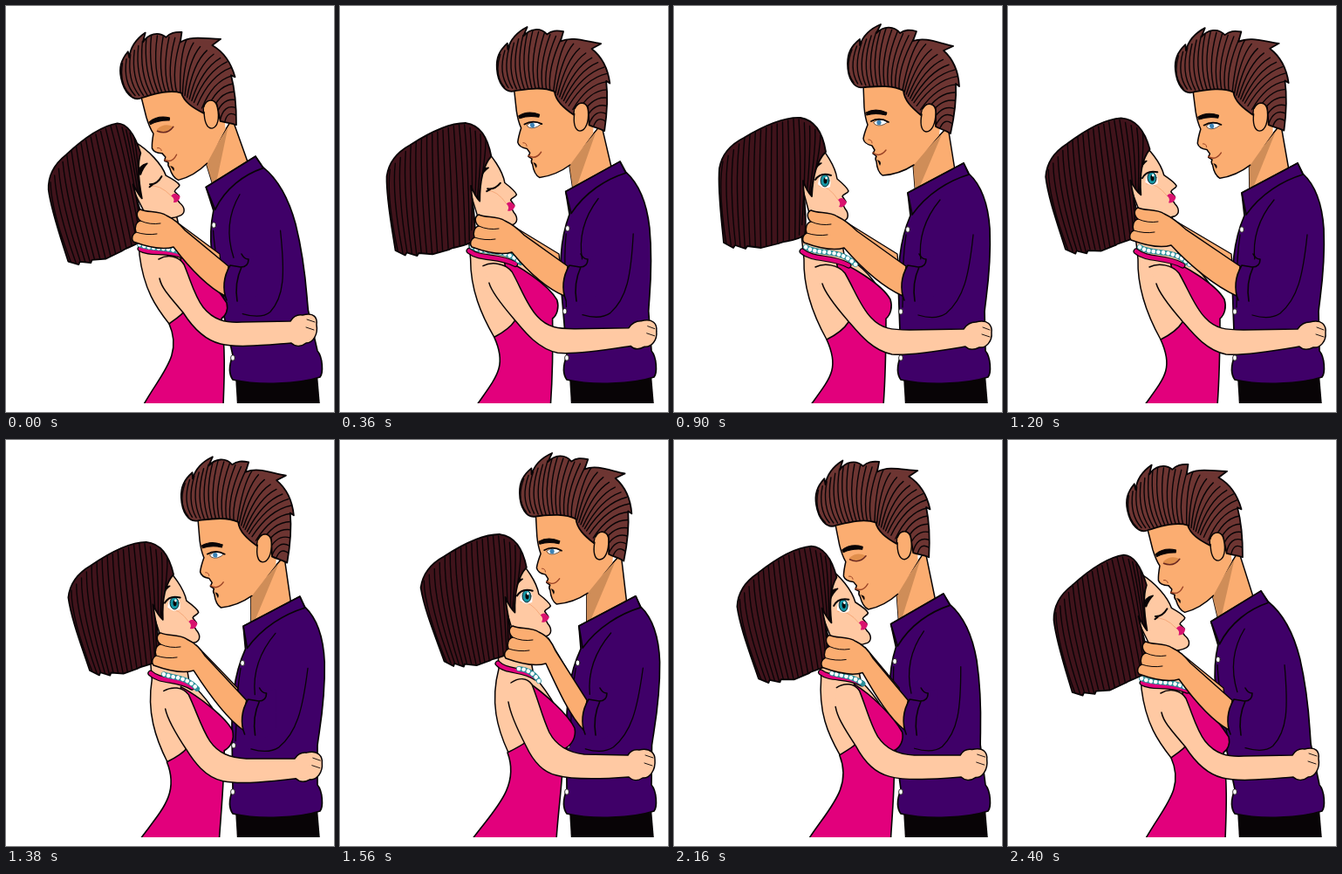
Write an HTML page with a canvas that moves like this. It is 376 by 465 pixels and loops after 2.46 s.

```html
<!DOCTYPE html>
<html lang="en">
<head>
<meta charset="utf-8">
<title>Couple</title>
<style>
html, body { margin: 0; width: 100%; height: 100%; overflow: hidden; background: #fff; }
canvas { display: block; width: 376px; height: 465px; }
</style>
</head>
<body>
<canvas id="stage" width="376" height="465"></canvas>
<script>
const ctx = document.getElementById('stage').getContext('2d');
const LOOP = 2460, STEP = 60;
const INK = '#080406', TAN = '#fbad71', TAN_DARK = '#cf8d58', PEACH = '#ffc9a3';
const PURPLE = '#3f0068', PINK = '#e2007c', BROWN = '#6d3532', MAROON = '#40131b';

// time, his head x y angle, her head x y angle, hair bend, lean, elbow, body near, body kiss, his eye, her eye
const POSES = [
  [0, 235, 125, -12, 170, 199, -12, 0, -46, -11, 0, 1, 0, 0],
  [60, 232, 126, -12.5, 167, 200, -12, 0, -49, -12, 0, 1, 0, 0],
  [360, 276, 128, -4, 175, 205, -2, 2, -11, -5, 0, .15, .9, 0],
  [900, 291, 129, 0, 173, 200, 0, 0, 0, 0, 0, 0, 1, 1],
  [1140, 287, 128, -5, 154, 197, -8, 10, -2, 0, -.08, 0, 1, 1],
  [1200, 289, 128, -5, 165, 197, -6, 9, 0, 0, 0, 0, 1, 1],
  [1560, 299, 122, -1, 214, 179, -2, 19, 7, 17, 1, 0, 1, 1],
  [1920, 285, 121, -6, 211, 183, -4, 17, -6, 12, 1, 0, 0, 1],
  [2400, 240, 123, -12, 174, 197, -11, 0, -42, -9, 0, 1, 0, 0]
];

function poseAt(t) {
  const n = POSES.length;
  const row = i => {
    const p = POSES[(i + n) % n].slice();
    p[0] += LOOP * Math.floor(i / n);
    return p;
  };
  let i = n - 1;
  while (POSES[i][0] > t) i--;
  const [z, a, b, c] = [row(i - 1), row(i), row(i + 1), row(i + 2)];
  const h = b[0] - a[0], s = (t - a[0]) / h;
  return a.map((v, k) => {
    const m0 = (b[k] - z[k]) / (b[0] - z[0]) * h;
    const m1 = (c[k] - a[k]) / (c[0] - a[0]) * h;
    const d = b[k] - v;
    return v + s * (m0 + s * (3 * d - 2 * m0 - m1 + s * (m0 + m1 - 2 * d)));
  });
}

// Maps every coordinate pair of a path through f
const warp = (d, f) => d.replace(/(-?[\d.]+) (-?[\d.]+)/g,
  (_, x, y) => f(+x, +y).map(v => v.toFixed(2)).join(' '));

// Blends three paths of equal structure
function blend([a, b, c], u, v) {
  const nums = s => s.match(/-?[\d.]+/g).map(Number);
  const B = nums(b), C = nums(c);
  let i = 0;
  return a.replace(/-?[\d.]+/g, s => {
    const n = +s, r = n + u * (B[i] - n) + v * (C[i] - n);
    i++;
    return r.toFixed(2);
  });
}

function draw(d, fill, stroke, width = 1.5) {
  const p = new Path2D(d);
  if (fill) { ctx.fillStyle = fill; ctx.fill(p); }
  if (stroke) { ctx.strokeStyle = stroke; ctx.lineWidth = width; ctx.stroke(p); }
}

function oval(x, y, rx, ry, fill, stroke, width) {
  ctx.beginPath();
  ctx.ellipse(x, y, rx, ry, 0, 0, 7);
  ctx.fillStyle = fill;
  ctx.fill();
  if (stroke) { ctx.strokeStyle = stroke; ctx.lineWidth = width; ctx.stroke(); }
}

function along(pts, k) {
  const f = k * (pts.length - 1), i = Math.min(Math.floor(f), pts.length - 2), s = f - i;
  return pts[i].map((v, j) => v + s * (pts[i + 1][j] - v));
}

function hair(outline, color, from, to, count, bulge, map = (x, y) => [x, y]) {
  const shape = warp(outline, map);
  draw(shape, color, INK, 1.8);
  ctx.save();
  ctx.clip(new Path2D(shape));
  for (let i = 0; i < count; i++) {
    const k = i / (count - 1), [x, y] = along(from, k), [X, Y] = along(to, k);
    const [bx, by] = bulge(k);
    draw(warp(`M${x} ${y} Q${(x + X) / 2 + bx} ${(y + Y) / 2 + by} ${X} ${Y}`, map), null, INK, 1.4);
  }
  ctx.restore();
}

function inHead(x, y, angle, px, py, paintHead) {
  ctx.save();
  ctx.translate(x, y);
  ctx.rotate(angle * Math.PI / 180);
  ctx.translate(-px, -py);
  paintHead();
  ctx.restore();
}

const QUIFF = 'M218 93 C206 96 199 82 199 66 C199 54 203 46 213 38 L213 45 C217 33 225 26 237 21 L232 31 ' +
  'C240 23 252 22 259 31 C265 27 270 27 278 29 L274 40 C288 35 302 42 320 46 L309 51 C319 60 326 74 327 92 ' +
  'L323 89 C324 108 321 128 317 146 C311 142 305 141 300 138 L300 118 C296 110 288 112 285 118 L283 125 ' +
  'C272 116 264 108 263 97 C250 90 232 92 218 93 Z';

function manHead(open) {
  draw('M217 90 L218 116 Q219 128 222 136 Q218 146 217 152 Q218 158 227 160 L230 165 L228 169 L232 172 ' +
    'Q230 175 232 178 Q233 190 239 194 Q258 193 275 182 L304 148 L308 110 L280 80 Z', TAN);
  draw('M217 90 L218 116 Q219 128 222 136 Q218 146 217 152 Q218 158 227 160 L230 165 L228 169 L232 172 ' +
    'Q230 175 232 178 Q233 190 239 194 Q258 193 275 182', null, INK);
  hair(QUIFF, BROWN, [[206, 88], [236, 94], [262, 96], [276, 112], [304, 142]],
    [[204, 50], [240, 24], [282, 38], [325, 76], [320, 136]], 27,
    k => k < .5 ? [-10, 4] : [-2, -13]);
  draw('M285 118 C290 109 300 111 300 122 C300 134 296 144 289 144 C283 143 282 134 284 124', TAN, INK, 1.4);
  draw('M220 122 Q231 116 244 122 L243 125 Q231 122 221 125 Z', INK, INK, 1);
  if (open > .5) {
    draw('M229 133 Q237 127 245 133 Q237 139 231 136 Z', '#fff', INK, .6);
    oval(235, 133.5, 2.6, 2.8, '#3d83b5');
    draw('M226 132 Q236 127 246 133', null, INK, 1.7);
  } else {
    draw('M227 132 Q237 126 246 133 Q237 140 227 135 Z', '#e08f4c');
    draw('M227 134 Q237 141 246 133', null, '#6b2a22', 1.5);
  }
  draw('M228 168 Q236 174 243 165', null, '#9a4326', 1.4);
  draw('M233 176 Q239 178 236 183 Z', INK);
  draw('M223 153 Q227 153 227 157', null, '#9a4326', .9);
}

const BOB = 'M57 271 C54 240 50 210 52 186 C55 168 68 157 80 151 C100 139 125 127 145 128 ' +
  'C163 131 171 148 174 167 C165 176 159 192 158 218 C153 213 150 206 148 200 C148 215 153 240 150 262 ' +
  'C140 270 124 269 120 272 L100 277 L84 275 L82 278 L70 274 L68 277 Z';

function womanHead(open, bend, fringe) {
  draw('M148 150 L160 153 C174 166 185 184 187 198 C193 203 199 208 200 212 C199 215 194 215 193 218 L197 224 ' +
    'L194 228 L196 232 C201 238 200 244 195 246 C185 249 170 245 155 237 L145 200 Z', PEACH, INK);
  draw('M166 206 Q178 206 188 222', null, '#f5a778', .9);
  draw('M188 222 Q193 217 198 225 Q195 232 189 230 Q192 226 188 222 Z', '#d8126f');
  draw('M156 190 Q159 180 169 180 Q163 184 159 191 Z', INK, INK, 1.4);
  if (open > .5) {
    draw('M165 204 Q166 193 175 192 Q181 196 179 207 Q171 211 165 204 Z', '#fff');
    oval(173, 200, 5, 7, '#1595a4', INK, .8);
    oval(173.5, 200, 2, 3.4, INK);
    oval(174.5, 197, 1.3, 1.6, '#fff');
    draw('M162 199 Q168 190 180 194', null, INK, 2);
  } else {
    draw('M167 204 Q175 206 182 198 M170 205 L166 207', null, INK, 2);
  }
  const tuck = (x, y) => [
    x + bend * Math.max(0, (173 - x) / 116) * Math.max(0, (y - 190) / 81) - fringe * Math.max(0, (x - 150) / 24),
    y
  ];
  hair(BOB, MAROON, [[56, 178], [84, 148], [112, 137], [140, 128], [168, 145]],
    [[60, 273], [84, 277], [112, 275], [142, 268], [156, 216]], 19, k => [14 * k - 8, -14], tuck);
}

const TORSO = [
  'M146 262 L149 290 C148 325 160 355 175 382 L215 372 L245 345 C235 315 212 295 195 285 L188 240 Z',
  'M181 240 L182 262 C172 300 180 330 193 358 L225 360 L262 345 C258 320 240 290 222 270 L215 230 Z',
  'M152 260 L153 285 C158 325 172 345 187 364 L220 360 L245 345 C238 315 220 295 205 283 L195 238 Z'
];
const DRESS = [
  'M175 382 C185 377 195 370 200 362 L186 292 C200 296 238 318 248 336 C251 345 248 354 243 358 C243 395 242 430 240 458 L156 458 C180 425 190 415 175 382 Z',
  'M192 358 C202 353 208 350 213 346 L212 275 C235 290 262 315 269 330 C271 340 266 350 256 354 C256 385 250 425 248 458 L151 458 C175 425 207 398 192 358 Z',
  'M187 364 C195 358 200 355 203 351 L200 285 C220 296 240 320 253 340 C255 348 252 355 247 358 C252 395 250 430 249 458 L157 458 C178 420 203 400 187 364 Z'
];
const STRAP = [
  'M147 281 C160 292 180 286 200 297',
  'M181 256 C190 266 210 262 224 272',
  'M154 278 C165 285 185 278 205 287'
];
const BEADS = [
  'M151 276 C165 286 188 276 208 296',
  'M205 262 C212 262 222 266 228 276',
  'M153 273 C168 280 185 275 203 283'
];
const ARM = [
  'M162 299 C172 294 188 296 196 306 C207 325 214 345 226 357 C238 370 250 371 270 371 L332 370 C336 364 340 362 346 362 C360 358 365 366 364 374 C365 384 358 392 350 391 C344 394 338 394 334 390 C310 394 270 401 250 399 C225 394 208 370 199 360 C180 338 172 325 170 318',
  'M196 278 C205 272 214 272 220 280 C228 300 232 318 240 335 C248 350 262 358 280 360 L330 361 C333 356 337 354 343 355 C357 352 361 360 361 366 C362 378 355 388 347 387 C341 391 335 390 331 386 C305 388 270 390 248 384 C230 380 220 365 213 350 C200 325 195 312 193 300',
  'M175 290 C185 284 198 286 204 296 C212 315 216 332 226 345 C238 360 252 363 270 362 L326 361 C329 356 334 353 340 354 C354 350 357 358 356 365 C358 376 352 386 344 386 C338 391 331 390 327 386 C300 388 265 392 246 387 C225 382 210 362 203 351 C185 330 178 322 176 312'
];
const KNUCKLES = [
  'M354 368 L362 371 M353 376 L362 379',
  'M350 361 L359 364 M349 370 L358 373',
  'M345 359 L354 362 M344 368 L353 371'
];

function shirt(lean) {
  draw(warp('M268 214 L332 180 L338 192 C352 205 360 225 362 255 C364 300 358 330 356 350 L357 395 ' +
    'C363 402 364 420 360 425 C335 433 290 435 260 428 C254 420 257 408 260 400 L258 345 ' +
    'C256 300 258 270 271 240 Z', lean), PURPLE, INK, 1.7);
  draw(warp('M268 214 L332 180 L338 193 C315 200 290 215 273 239 Z', lean), PURPLE, INK, 1.7);
  draw(warp('M305 222 C286 245 280 268 283 292 M343 262 C338 310 332 335 312 352 C303 358 290 357 280 354 ' +
    'M266 262 C262 290 263 300 262 345', lean), null, INK, 1.3);
  for (const [x, y] of [[268, 256], [260, 350], [260, 403]]) {
    oval(...lean(x, y), 2.4, 3.2, '#fff', INK, .8);
  }
}

function sleeve(elbow) {
  draw(warp('M288 288 L268 297 C260 310 259 325 264 337 C275 345 290 345 300 330 L300 285 Z', elbow), PURPLE);
  draw(warp('M281 284 Q284 290 289 290 Q289 299 280 299 L268 297 C260 310 259 325 264 337 ' +
    'M281 299 C275 312 274 325 276 338', elbow), null, INK, 1.6);
}

function paint(t) {
  const [, mx, my, ma, wx, wy, wa, bend, lean, ex, near, kiss, manEye, womanEye] = poseAt(t);
  const body = shapes => blend(shapes, near, kiss);
  const leaned = (x, y) => {
    const k = Math.max(0, (395 - y) / 215);
    return [x + lean * k, y - Math.abs(lean) * .17 * k];
  };
  const elbow = (x, y) => [x + ex, y];
  const reach = (x, y) => {
    const k = Math.min(1, Math.max(0, (x - 200) / 55));
    return [x + (1 - k) * (wx - 173) + k * ex, y + (1 - k) * (wy - 200)];
  };
  const r = ma * Math.PI / 180;
  const onHead = (x, y) => [
    mx + (x - 291) * Math.cos(r) - (y - 129) * Math.sin(r),
    my + (x - 291) * Math.sin(r) + (y - 129) * Math.cos(r)
  ];

  ctx.fillStyle = '#fff';
  ctx.fillRect(0, 0, 376, 465);
  ctx.lineJoin = ctx.lineCap = 'round';

  draw('M263 424 L357 422 L360 458 L265 458 Z', INK);

  const [jaw, nape, front, back, ear] = [onHead(274, 180), onHead(314, 138),
    leaned(277, 218), leaned(322, 188), onHead(307, 147)];
  draw(`M${jaw} L${front} L${back} L${nape} Z`, TAN, INK);
  draw(`M${jaw} L${front} L${ear} Z`, TAN_DARK);
  shirt(leaned);
  inHead(mx, my, ma, 291, 129, () => manHead(manEye));

  draw(warp('M198 248 L256 284 L258 304 L205 266 Z', reach), TAN, INK, 1.3);
  draw(body(TORSO), PEACH, INK);
  draw(body(DRESS), PINK, INK, 1.6);
  draw(body(STRAP), null, INK, 7);
  draw(body(STRAP), null, PINK, 4.6);
  draw(body(BEADS), null, '#2b8f9a', 6);
  ctx.setLineDash([.1, 5.5]);
  draw(body(BEADS), null, '#fff', 4.6);
  ctx.setLineDash([]);

  inHead(wx, wy, wa, 173, 200, () => womanHead(womanEye, bend, 10 * kiss));

  draw(warp('M157 234 C165 238 178 235 187 241 C198 246 204 252 210 258 L266 298 L262 332 ' +
    'C240 322 215 300 195 277 C180 282 160 275 149 271 C146 267 148 262 152 260 C150 255 152 248 157 247 ' +
    'C152 243 152 236 157 234 Z', reach), TAN, INK);
  draw(warp('M157 247 Q168 252 180 250 M152 260 Q164 264 176 262', reach), null, INK, 1);
  sleeve(elbow);

  draw(body(ARM), PEACH, INK);
  draw(body(KNUCKLES), null, INK, .9);

  ctx.fillStyle = '#fff';
  ctx.fillRect(0, 455, 376, 10);
}

function tick() {
  paint(Math.floor(performance.now() % LOOP / STEP) * STEP);
  requestAnimationFrame(tick);
}
tick();
</script>
</body>
</html>
```
